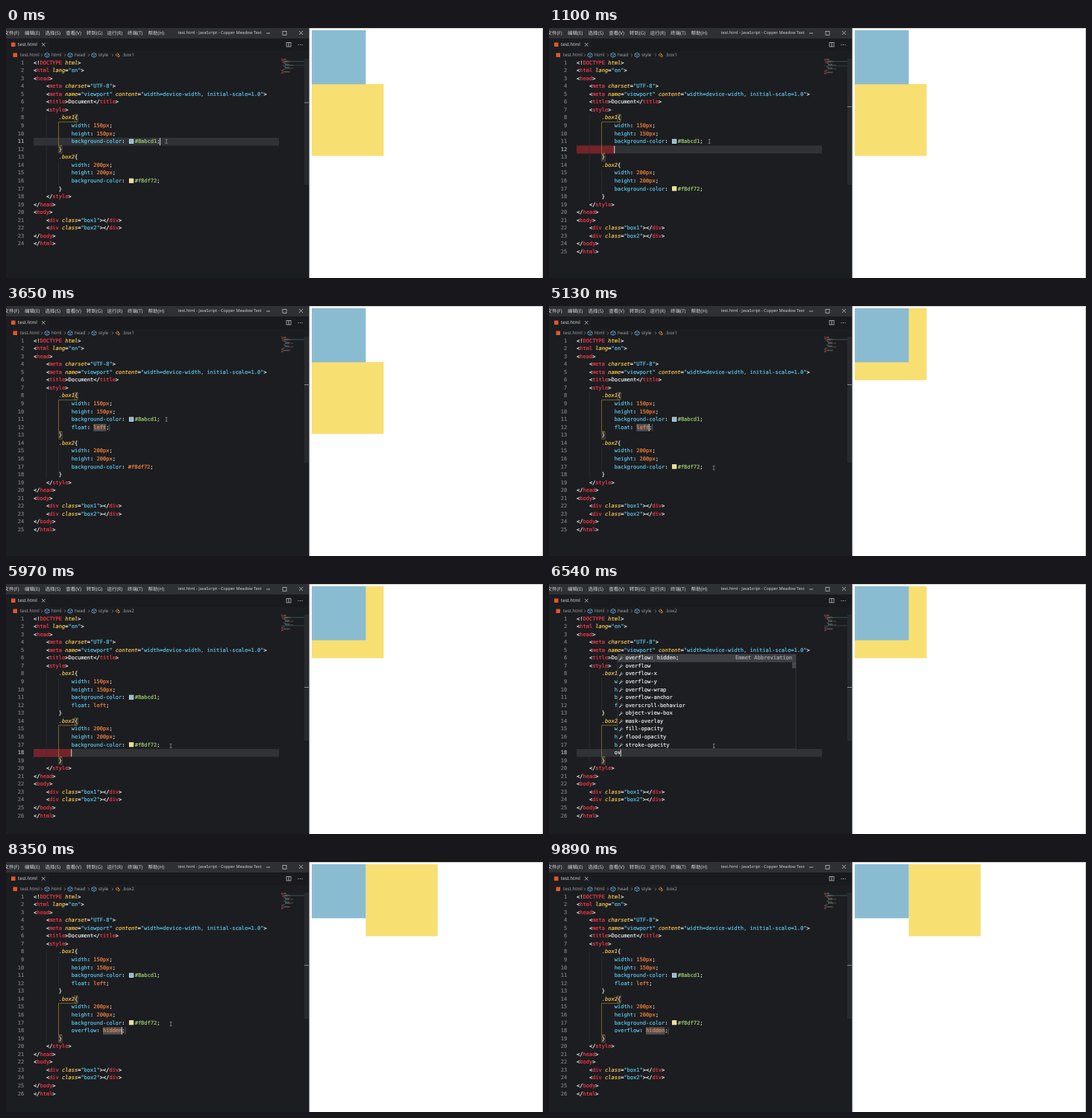
These frames come from a looping animation (720x335 px, 9.99 s). An HTML page with a canvas:

```html
<!DOCTYPE html>
<html lang="en">
<head>
<meta charset="UTF-8">
<title>Float and overflow demo</title>
<style>
  html, body { margin: 0; width: 100%; height: 100%; overflow: hidden; background: #fff; }
  canvas { display: block; }
</style>
</head>
<body>
<canvas id="stage" width="720" height="335"></canvas>
<script>
const ctx = document.getElementById('stage').getContext('2d');
const LOOP = 9990;
const LEFT = 37, TOP = 41.4, ROW = 10.565, CHAR = 4.225, SWATCH = 8.9;
const MONO = '"DejaVu Sans Mono", monospace';
const SANS = '"Open Sans", "Noto Sans CJK SC", "Noto Sans CJK", sans-serif';
const COLOR = {
  text: '#ececec', tag: '#f7394d', attr: '#f8c850', string: '#5cc6ea', prop: '#5cc6ea',
  number: '#fb8740', hex: '#a2d376', dim: '#a9aaad', gold: '#8d7632', bg: '#1c1d20',
};
const BLUE = '#8abcd1', YELLOW = '#f8df72';

// Earlier rules win; everything else is plain text.
const RULES = [
  ['string', '"[^"]*"'],
  ['tag', '(?<=<[!/]?)\\w+'],
  ['attr', '\\w+(?==)|(?<=DOCTYPE )html|\\.\\w+'],
  ['prop', '[\\w-]+(?=:)'],
  ['hex', '#\\w+'],
  ['number', '\\d+px|\\b(?:left|hidden)\\b'],
  ['text', '\\S'],
];
const TOKEN = new RegExp(RULES.map(rule => `(${rule[1]})`).join('|'), 'g');

const CARET_OFF = [[410, 820], [2640, 3070], [3650, 4050], [4590, 5130],
  [5680, 5970], [7910, 8350], [8890, 9300], [9890, LOOP]];
const FONT_ITEMS = ['font: 1em sans-serif;', 'font-size', 'float', 'font-weight', 'font-family', 'font-style',
  'font', 'flex-direction', 'flex', 'fill', 'flex-wrap', 'flex-grow'];
const FLOAT_ITEMS = ['float: left;', 'float', 'flex', 'flex-direction', 'flex-wrap', 'flex-grow', 'flex-flow',
  'flex-shrink', 'flex-basis', 'flood-color', 'flood-opacity', 'fill'];
const OUTLINE_ITEMS = ['outline: ;', 'overflow', 'opacity', 'outline', 'order', 'overflow-x', 'overflow-y',
  'object-fit', 'outline-color', 'outline-style', 'outline-width', 'orphans'];
const OVERFLOW_ITEMS = ['overflow: hidden;', 'overflow', 'overflow-x', 'overflow-y', 'overflow-wrap',
  'overflow-anchor', 'overscroll-behavior', 'object-view-box', 'mask-overlay', 'fill-opacity',
  'flood-opacity', 'stroke-opacity'];

const between = (t, from, to) => t >= from && t < to;
const at = (t, ...keys) => keys.reduce((value, [time, next]) => t >= time ? next : value, undefined);
const rowTop = n => TOP + (n - 1) * ROW;
const rowMid = n => rowTop(n) + ROW / 2;
const colX = col => LEFT + col * CHAR;

function rect(x, y, w, h, color) {
  ctx.fillStyle = color;
  ctx.fillRect(x, y, w, h);
}

function frame(x, y, w, h, color, width = .7) {
  ctx.strokeStyle = color;
  ctx.lineWidth = width;
  ctx.strokeRect(x, y, w, h);
}

function path(points, color, width = .8) {
  ctx.strokeStyle = color;
  ctx.lineWidth = width;
  ctx.beginPath();
  points.forEach(([x, y]) => ctx.lineTo(x, y));
  ctx.stroke();
}

function label(text, x, y, size, color = COLOR.dim, align = 'left') {
  ctx.font = `${size}px ${SANS}`;
  ctx.textAlign = align;
  ctx.fillStyle = color;
  ctx.fillText(text, x, y);
}

// A hairline stroke gives the code its slightly heavy weight.
function codeText(text, x, y, color, italic) {
  ctx.font = `${italic ? 'italic ' : ''}7.02px ${MONO}`;
  ctx.textAlign = 'left';
  ctx.fillStyle = ctx.strokeStyle = color;
  ctx.lineWidth = .18;
  [...text].forEach((ch, i) => {
    ctx.fillText(ch, x + i * CHAR, y);
    ctx.strokeText(ch, x + i * CHAR, y);
  });
}

function tokens(line, plain) {
  return [...line.matchAll(TOKEN)].map(match => ({
    text: match[0], col: match.index,
    kind: plain ? 'text' : RULES[match.slice(1).findIndex(group => group !== undefined)][0],
  }));
}

function sourceLines(first, second) {
  const rule = (name, size, color, extra) => [
    `        .${name}{`, `            width: ${size}px;`, `            height: ${size}px;`,
    `            background-color: ${color};`,
    ...(extra === undefined ? [] : ['            ' + extra]), '        }',
  ];
  return [
    '<!DOCTYPE html>', '<html lang="en">', '<head>', '    <meta charset="UTF-8">',
    '    <meta name="viewport" content="width=device-width, initial-scale=1.0">',
    '    <title>Document</title>', '    <style>',
    ...rule('box1', 150, BLUE, first), ...rule('box2', 200, YELLOW, second),
    '    </style>', '</head>', '<body>',
    '    <div class="box1"></div>', '    <div class="box2"></div>', '</body>', '</html>',
  ];
}

function stateAt(t) {
  const first = at(t, [820, ''], [1500, 'f'], [2130, 'fl'], [3070, 'float: left;']);
  const second = at(t, [5970, ''], [6270, 'o'], [6540, 'ov'], [7360, 'overflow: hidden;']);
  const line = at(t, [0, 11], [820, 12], [5280, 17], [5970, 18]);
  const selected = between(t, 3070, 5280) ? [19, 4] : t >= 7360 ? [22, 6] : null;
  const lines = sourceLines(first, second);
  const onColorLine = line === 11 || line === 17;
  const caretCol = selected ? selected[0] + selected[1] : lines[line - 1].length;
  const plainLine = at(t, [820, 12], [3220, 0], [5970, 18], [7480, 0]);
  return {
    lines, line, selected, plainLine, second: t >= 5280,
    caretX: colX(caretCol) + (onColorLine ? SWATCH : 0),
    caretOn: !CARET_OFF.some(([from, to]) => between(t, from, to)),
    blank: between(t, 820, 1500) || between(t, 5970, 6270),
    errors: between(t, 1740, 3650) || between(t, 6940, 7910),
    hasSwatch: color => color === BLUE || !between(t, 1500, 4170),
  };
}

function cube(x, y, color) {
  path([[x, y - 3], [x + 3, y - 1.5], [x + 3, y + 1.5], [x, y + 3], [x - 3, y + 1.5], [x - 3, y - 1.5], [x, y - 3]], color);
  path([[x - 3, y - 1.5], [x, y], [x + 3, y - 1.5]], color, .6);
  path([[x, y], [x, y + 3]], color, .6);
}

function drawChrome(state) {
  rect(0, 0, 406, 335, COLOR.bg);
  rect(0, 0, 406, 14, '#2f3034');
  rect(57, 14, 349, 17, '#191a1d');
  ['文件(F)', '编辑(E)', '选择(S)', '查看(V)', '转到(G)', '运行(R)', '终端(T)', '帮助(H)']
    .forEach((text, i) => label(text, -2.6 + i * 27.6, 7, 6.5, '#d8d8d8'));
  label('test.html - JavaScript - Copper Meadow Text', 286.5, 6.8, 5.55, '#d8d8d8', 'center');
  path([[349, 7], [354, 7]], '#ccc');
  frame(371, 4.5, 5, 5, '#ccc');
  path([[393, 4], [398, 9]], '#ccc');
  path([[398, 4], [393, 9]], '#ccc');

  rect(7, 19.5, 5.5, 5.5, '#e2582b');
  label('test.html', 16, 22.3, 6.2, '#e4e4e4');
  path([[48, 20], [52.5, 24.5]], '#ccc');
  path([[52.5, 20], [48, 24.5]], '#ccc');
  frame(376, 19.5, 6, 5.5, '#ccc');
  path([[379, 19.5], [379, 25]], '#ccc');
  [391.5, 394, 396.5].forEach(x => rect(x, 22, 1, 1, '#ccc'));

  rect(9.5, 33.5, 5.5, 5.5, '#e2582b');
  label('test.html', 19, 36.3, 6.2);
  [[61, 'html'], [92, 'head'], [124, 'style'], [156, state.second ? '.box2' : '.box1']].forEach(([x, text], i) => {
    path([[x - 14, 34.5], [x - 12.3, 36.3], [x - 14, 38.1]], '#909195', .7);
    if (i < 3) {
      cube(x - 6, 36.3, '#62aedb');
    } else {
      path([[x - 9, 36], [x - 6.5, 33.7], [x - 5, 35], [x - 7.5, 37.5], [x - 9, 36]], '#e59a3c');
      path([[x - 6, 36], [x - 4, 36], [x - 4, 38.5], [x - 6.5, 38.5]], '#e59a3c');
    }
    label(text, x, 36.3, 6.2);
  });
}

function drawGuides({ lines, second }) {
  const opens = lines.map((text, i) => text.endsWith('{') ? i + 1 : 0).filter(Boolean);
  const styleEnd = lines.indexOf('    </style>') + 1;
  path([[colX(4) + .3, rowTop(8)], [colX(4) + .3, rowTop(styleEnd)]], '#303136', .6);
  opens.forEach((open, i) => {
    const close = lines.indexOf('        }', open) + 1;
    const x = 70.5, top = rowTop(open + 1), bottom = rowTop(close);
    if (i === +second) {
      path([[x + 25, top], [x, top], [x, bottom], [x + 4.5, bottom]], COLOR.gold);
      frame(colX(13), rowTop(open) + .6, CHAR, ROW - 1.2, COLOR.gold, .6);
      frame(colX(8), rowTop(close) + .6, CHAR, ROW - 1.2, COLOR.gold, .6);
    } else {
      path([[x, top], [x, bottom]], '#34353a', .6);
    }
  });
}

function drawCode(state) {
  const { lines, line, selected } = state;
  if (!selected) rect(LEFT, rowTop(line), 329, ROW, '#303236');
  if (state.blank) rect(LEFT, rowTop(line), 12 * CHAR, ROW, '#74232a');
  if (selected) {
    rect(colX(selected[0]), rowTop(line) + .4, selected[1] * CHAR, ROW - .8, '#4c5258');
    rect(colX(lines[line - 1].length), rowTop(line) + .4, .7, ROW - .8, '#6b6e72');
  }
  drawGuides(state);
  lines.forEach((text, i) => {
    const n = i + 1, y = rowMid(n);
    const active = n === line && !selected;
    codeText(String(n), 24.2 - String(n).length * CHAR, y, active ? '#b4b5b8' : '#7d7e82');
    let shift = 0;
    for (const token of tokens(text, n === state.plainLine)) {
      let color = COLOR[token.kind];
      if (token.kind === 'hex') {
        if (state.hasSwatch(token.text)) {
          rect(colX(token.col) + 1.2, y - 3.6, 6.2, 6.2, '#eee');
          rect(colX(token.col) + 1.8, y - 3, 5, 5, token.text);
          shift = SWATCH;
        } else {
          color = COLOR.number;
        }
      }
      codeText(token.text, colX(token.col) + shift, y, color, token.kind === 'attr');
    }
  });
  if (state.errors && state.second) rect(colX(6), rowMid(lines.length) + 4, CHAR, .9, '#e0384a');
  if (state.caretOn) rect(state.caretX - .4, rowTop(line) + .3, .9, ROW - .6, '#e6e6e6');
}

function drawMinimap(state) {
  const pitch = .83, scale = .42, top = 41.3;
  ctx.globalAlpha = .5;
  state.lines.forEach((text, i) => tokens(text, i + 1 === state.plainLine).forEach(token =>
    rect(369 + token.col * scale, top + i * pitch, token.text.length * scale, .65, COLOR[token.kind])));
  ctx.globalAlpha = 1;
  const y = top + (state.line - 1) * pitch;
  if (state.errors) {
    rect(369, y + 1.5, 31, 1.4, 'rgba(190,32,42,.6)');
    rect(369, top + (state.lines.length - 1) * pitch, 31, .8, 'rgba(190,32,42,.35)');
  } else if (!state.selected) {
    rect(369, y, 31, .9, 'rgba(90,120,140,.4)');
  }
  rect(400, 41, 6, 169, '#292a2e');
  rect(400, 39 + 5.5 * state.line, 6, 1, '#85888c');
  if (state.errors) {
    const marks = state.second ? [[143, 6], [183, 6]] : [[109, 6], [124, 21]];
    marks.forEach(([markY, height]) => rect(404, markY, 2, height, '#a3343c'));
  }
}

function drawPopup(t) {
  const items = at(t, [1620, FONT_ITEMS], [2130, FLOAT_ITEMS], [3070, null],
    [6270, OUTLINE_ITEMS], [6540, OVERFLOW_ITEMS], [7360, null]);
  if (!items) return;
  const above = t > 5000, height = 12 * ROW, x = 92, width = items === OVERFLOW_ITEMS ? 239 : 206;
  const top = above ? rowTop(18) - height : rowTop(13);
  rect(x, top, width, height, '#1d1e21');
  rect(x, top, width, ROW, '#3e4046');
  frame(x, top, width, height, '#434448', .6);
  items.forEach((text, i) => {
    const y = top + (i + .5) * ROW;
    path([[x + 2.3, y + 2.6], [x + 5, y - .2]], '#c5c5c5', 1.2);
    path([[x + 5.6, y - 2.7], [x + 4.4, y - 1.3], [x + 5.6, y], [x + 7.2, y - .9]], '#c5c5c5');
    codeText(text, x + 10.4, y, COLOR.text);
  });
  const note = 'Emmet Abbreviation';
  codeText(note, x + width - 5 - note.length * CHAR, top + ROW / 2, '#a9aaad');
  rect(x + width - 5, top + ROW, 5, 8, '#47484c');
}

function drawPage(t) {
  rect(406, 0, 314, 335, '#fff');
  rect(406, 0, 1, 335, '#77787a');
  rect(407, 0, 313, .8, '#c4c4c4');
  rect(719, 0, 1, 335, '#c4c4c4');
  const [x, y] = at(t, [0, [410, 75]], [4050, [410, 3]], [8350, [482.4, 3]]);
  rect(x, y, 96.4, 96.4, YELLOW);
  rect(410, 3, 72.4, 72.4, BLUE);
}

function drawMouse(t) {
  if (t < 8750) {
    const p = Math.max(0, Math.min(1, (Math.floor((t - 4450) / 136) + 1) / 6));
    const x = 215 + 6 * p, y = 152 + 65 * p;
    [-2.6, 2.6].forEach(dy => path([[x - 1.4, y + dy], [x + 1.4, y + dy]], '#a8a9ac', .6));
    path([[x, y - 2.6], [x, y + 2.6]], '#a8a9ac', .7);
    return;
  }
  const spot = at(t, [8750, [430, 130]], [8890, [545, 47]], [9030, [612, 82]],
    [9160, [656, 190]], [9300, [686, 323]], [9440, null]);
  if (!spot) return;
  const [x, y] = spot;
  ctx.beginPath();
  [[0, 0], [0, 8], [2, 6.2], [3.4, 9], [4.6, 8.4], [3.3, 5.8], [5.8, 5.6]]
    .forEach(([dx, dy]) => ctx.lineTo(x + dx, y + dy));
  ctx.closePath();
  ctx.fillStyle = '#fff';
  ctx.fill();
  ctx.strokeStyle = '#222';
  ctx.lineWidth = .7;
  ctx.stroke();
}

function draw(now) {
  const t = now % LOOP, state = stateAt(t);
  ctx.textBaseline = 'middle';
  ctx.textRendering = 'geometricPrecision';
  drawChrome(state);
  drawCode(state);
  drawMinimap(state);
  drawPopup(t);
  drawPage(t);
  drawMouse(t);
}

let start;
function tick(now) {
  start ??= now;
  draw(Math.max(0, now - start));
  requestAnimationFrame(tick);
}
requestAnimationFrame(tick);
</script>
</body>
</html>
```
